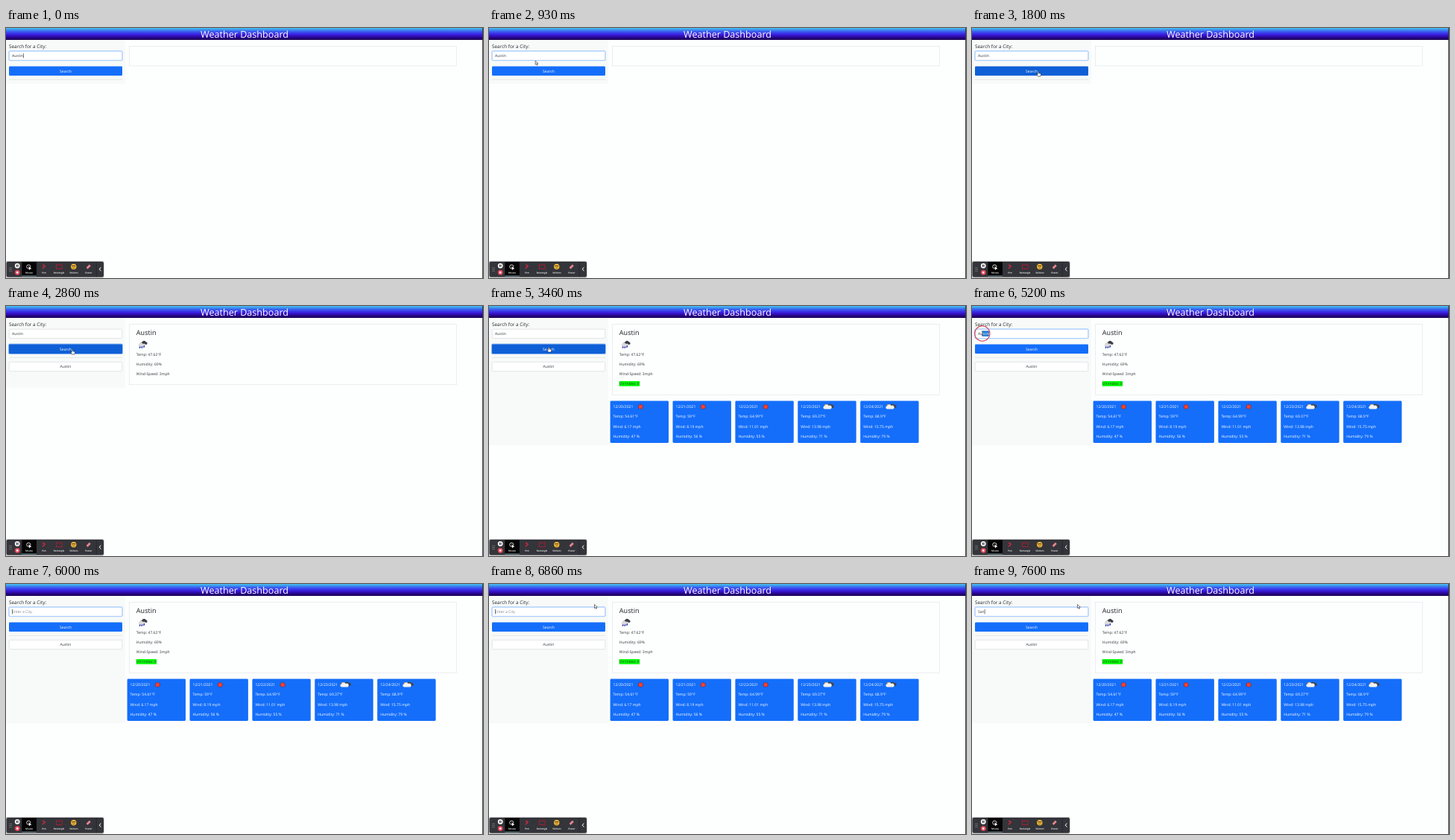
Write an HTML page that moves like this. It is 640 by 336 pixels and loops after 8000 ms.

```html
<!DOCTYPE html>
<html lang="en">
<head>
<meta charset="utf-8">
<title>Weather Dashboard</title>
<style>
html, body { margin: 0; width: 100%; height: 100%; overflow: hidden; background: #fdfefe; }
svg { display: block; width: 640px; height: 336px; }
text { font: 5.05px "Open Sans", "Noto Sans", sans-serif; fill: #33383d; text-rendering: geometricPrecision; white-space: pre; }
.mid { text-anchor: middle; }
.title { font-size: 12.6px; font-weight: 500; fill: #fff; }
.label { font-size: 6.4px; font-weight: 500; fill: #212529; }
.city { font-size: 9.1px; font-weight: 500; fill: #212529; }
.white { fill: #fff; }
.tool { font-size: 3.1px; font-weight: 600; fill: #fff; text-anchor: middle; }
.hint { fill: #7b848c; }
.box { fill: #fff; stroke: #ced4da; stroke-width: .6; }
</style>
</head>
<body>
<svg viewBox="0 0 640 336">
  <defs>
    <linearGradient id="sky" x2="0" y2="1">
      <stop stop-color="#45c4ee"/><stop offset=".3" stop-color="#3a5cf0"/>
      <stop offset=".55" stop-color="#3a1ee0"/><stop offset=".85" stop-color="#25007e"/>
      <stop offset="1" stop-color="#16004c"/>
    </linearGradient>
    <g id="sun">
      <path d="M0-4.2L1-2.4 3-3 2.5-1 4.2 0 2.5 1 3 3 1 2.4 0 4.2-1 2.4-3 3-2.5 1-4.2 0-2.5-1-3-3-1-2.4Z" fill="#7d2638"/>
      <circle r="2.7" fill="#f4402c"/>
    </g>
    <g id="cloud">
      <circle cx="-3" cy="-1" r="2.5" fill="#f0a53c"/>
      <path d="M0 1.5a2.3 2.3 0 0 1 0-4.4 3 3 0 0 1 5 .5 2 2 0 0 1 1.4 3.9Z" fill="#41464f"/>
      <path d="M-4.8 3a2 2 0 0 1 .2-4 3 3 0 0 1 5.3-.4 2.3 2.3 0 0 1 2.7 4.4Z" fill="#f3f3f3"/>
    </g>
    <g id="rain">
      <circle cx="-2" cy="-.5" r="2.4" fill="#ee9a55"/>
      <path d="M-1-.5a2 2 0 0 1 .5-3.6 2.8 2.8 0 0 1 4.8.2 2 2 0 0 1 1.2 3.4Z" fill="#3b3c45"/>
      <path d="M-4.6 2a1.7 1.7 0 0 1 .3-3.3 2.7 2.7 0 0 1 4.6 0 1.8 1.8 0 0 1 2.4 3.3Z" fill="#d9dade"/>
      <path d="M-3.3 2.2l-1 2.2M-.6 2.2l-1 2.2M2.2 1.2l-1 2.4" stroke="#2932a8" stroke-width="1.5"/>
    </g>
  </defs>

  <rect width="640" height="336" fill="#fdfefe"/>
  <rect id="side" y="16" width="160" fill="#f7faf8"/>
  <rect width="640" height="16" fill="url(#sky)"/>
  <text class="title mid" x="320" y="13.2">Weather Dashboard</text>

  <text class="label" x="4" y="26.6">Search for a City:</text>
  <rect id="ring" x="3.3" y="30.3" width="153.4" height="14" rx="2" fill="#bcd6fe"/>
  <rect id="field" class="box" x="4.2" y="31.2" width="151.6" height="12.2" rx="1.3"/>
  <rect id="mark" y="33.4" height="7.4" fill="#1a78d6"/>
  <text id="value" x="8" y="39"><tspan id="plain"></tspan><tspan id="picked" class="white"></tspan></text>
  <text id="hint" class="hint" x="8" y="39">Enter a City</text>
  <rect id="caret" y="34" width=".6" height="6.4" fill="#222"/>
  <rect id="glow" x="3" y="50.5" width="154" height="14.6" rx="2" fill="#8fb8f6"/>
  <rect id="button" x="4" y="51.6" width="152" height="12.4" rx="1.3"/>
  <text class="mid white" x="80" y="59.7">Search</text>
  <path d="M4 69.3H156" stroke="#d3d7d7" stroke-width=".6"/>
  <g id="history">
    <rect class="box" x="4.2" y="75.3" width="151.6" height="12.4" rx="1.3"/>
    <text class="mid" x="80" y="83.4">Austin</text>
  </g>

  <rect id="panel" x="165.4" y="24.5" width="439" fill="none" stroke="#dfe3e6" stroke-width=".6"/>
  <g id="today">
    <text class="city" x="174.8" y="39.2">Austin</text>
    <use href="#rain" x="183.5" y="52.2"/>
    <text x="174.8" y="66.5">Temp: 47.62°F</text>
    <text x="174.8" y="79.8">Humidity: 69%</text>
    <text x="174.8" y="93.2">Wind-Speed: 3mph</text>
  </g>
  <g id="forecast">
    <rect x="174.7" y="101" width="27.4" height="6.8" fill="#0f0"/>
    <text x="174.8" y="106.3">UV-Index: 0</text>
  </g>

  <g id="bar">
    <rect x="-1" y="313" width="133" height="23" rx="3" fill="#000" opacity=".18"/>
    <rect x=".5" y="314" width="130.5" height="20.8" rx="2" fill="#34353a"/>
    <path d="M5 321.8v6M7 321.8v6" stroke="#aaa" stroke-dasharray=".9 1.4"/>
    <circle cx="15.2" cy="319.6" r="3.4" fill="#fff"/>
    <path d="M14.4 318v3.2M16.1 318v3.2" stroke="#111" stroke-width=".9"/>
    <circle cx="15.2" cy="328.6" r="3.4" fill="#e5485a"/>
    <rect x="14" y="327.4" width="2.4" height="2.4" fill="#fff"/>
    <rect x="21.3" y="314.4" width="19.6" height="19" fill="#050506"/>
    <path d="M21.3 333.3h19.6" stroke="#8fb5c4" stroke-width=".8"/>
    <circle cx="30.3" cy="320.8" r="2.6" fill="none" stroke="#e9dcdc" stroke-width=".9"/>
    <path d="M30.3 320.3l4 3.6-1.9.2-1.3 1.5Z" fill="#fff"/>
    <path d="M49 323.2l3.8-3.6M49.2 319.4q1.4-1.5 2.2.2" stroke="#e02a42" stroke-width="1.3" fill="none"/>
    <rect x="67.5" y="318.2" width="7.6" height="5.4" fill="none" stroke="#a51d34"/>
    <circle cx="90.8" cy="320.8" r="3.7" fill="#f4bd38"/>
    <path d="M88.3 319.8h5" stroke="#5b3820" stroke-width="1.2"/>
    <path d="M89.1 322.1q1.7 1.5 3.4 0" stroke="#5b3820" stroke-width=".7" fill="none"/>
    <path d="M108.6 323l4.2-4.2" stroke="#e78591" stroke-width="2.8"/>
    <path d="M121.3 314.5v19.8" stroke="#222327" stroke-width=".7"/>
    <path d="M127.3 321.6l-2 2.5 2 2.5" stroke="#fff" fill="none"/>
  </g>
  <path d="M639.5 0V336" stroke="#30343a" stroke-width=".9"/>

  <circle id="press" r="10.2" fill="none" stroke="#d8435c" stroke-width="1.1"/>
  <g id="pointer" stroke="#222" stroke-width=".6" stroke-linejoin="round">
    <path id="arrow" d="M0 0V5l1.2-1 .9 1.9 1-.4-.9-1.9 1.6-.1Z" fill="#fff"/>
    <path id="hand" d="M-.8 0q.8-1 1.5 0v2l2.2.5q.9.3.6 1.6l-.7 2.1H-.6L-2 3.7q.2-1 1.2-.2Z" fill="#fff"/>
    <path id="beam" d="M-1-3h2M0-3v6M-1 3h2" fill="none"/>
  </g>
</svg>
<script>
const LOOP = 8000, SELECT_FROM = 4800, SELECT_TO = 5450, CLEAR = 5750;
const NS = "http://www.w3.org/2000/svg";
const $ = id => document.getElementById(id);
const set = (id, attrs) => { for (const k in attrs) $(id).setAttribute(k, attrs[k]); };
const show = (id, on) => $(id).style.display = on ? "" : "none";

function add(parent, tag, attrs, text = "") {
  const el = document.createElementNS(NS, tag);
  for (const k in attrs) el.setAttribute(k, attrs[k]);
  el.textContent = text;
  $(parent).append(el);
}

[["54.61", "6.17", 47], ["59", "8.19", 56], ["64.99", "11.01", 55],
 ["69.37", "13.98", 71], ["68.9", "15.75", 79]].forEach(([temp, wind, wet], i) => {
  const x = 162.6 + i * 83.9;
  add("forecast", "rect", { x, y: 127.6, width: 78.4, height: 56.4, rx: 1.4, fill: "#146efa" });
  [`12/${20 + i}/2021`, `Temp: ${temp}°F`, `Wind: ${wind} mph`, `Humidity: ${wet} %`].forEach((line, row) =>
    add("forecast", "text", { x: x + 4, y: 137 + row * 13.3, class: "white" }, line));
  add("forecast", "use", { href: i < 3 ? "#sun" : "#cloud", x: x + 40.8, y: 135.4 });
});
["Mouse", "Pen", "Rectangle", "Stickers", "Eraser"].forEach((name, i) =>
  add("bar", "text", { x: 31 + i * 20, y: 329.6, class: "tool" }, name));

// Pointer stops: time, x, y
const path = [[900, 62, 44], [1500, 89, 58.8], [3300, 89, 58.8], [4000, 24, 37], [SELECT_FROM, 24, 37],
  [5200, 13.8, 37], [SELECT_TO, 7, 37], [5850, 7, 37], [6500, 141.5, 27.5]];
function pointerAt(t) {
  const n = path.findIndex(p => p[0] > t);
  if (n < 0) return path.at(-1).slice(1);
  if (!n) return path[0].slice(1);
  const [a, b] = [path[n - 1], path[n]];
  const u = (t - a[0]) / (b[0] - a[0]), e = u * u * (3 - 2 * u);
  return [a[1] + (b[1] - a[1]) * e, a[2] + (b[2] - a[2]) * e];
}

const within = (t, a, b) => t >= a && t < b;

function draw(t) {
  const [x, y] = pointerAt(t);
  const loaded = t >= 2600, full = t >= 3050;
  const clicked = within(t, 2200, SELECT_FROM), focused = !clicked;
  const hover = x > 4 && x < 156 && y > 51 && y < 64 && t > 900;

  set("side", { height: full ? 171 : loaded ? 94 : 59 });
  set("panel", { height: full ? 94.8 : loaded ? 81.2 : 26.4 });
  show("history", loaded);
  show("today", loaded);
  show("forecast", full);
  show("ring", focused);
  set("field", { style: focused ? "stroke:#86b7fe" : "" });
  show("glow", clicked);
  set("button", { fill: hover || clicked ? "#0f5fd6" : "#146efa" });

  // Field text, selection and caret
  const text = t < CLEAR ? "Austin" : "San".slice(0, [7120, 7310, 7500].filter(k => t >= k).length);
  const value = $("value");
  $("plain").textContent = text;
  $("picked").textContent = "";
  const edge = n => 8 + (n ? value.getSubStringLength(0, n) : 0);
  const end = edge(text.length);
  let from = text.length;
  if (within(t, SELECT_FROM, CLEAR)) while (from && edge(from) > x + 1) from--;
  const left = edge(from);
  $("plain").textContent = text.slice(0, from);
  $("picked").textContent = text.slice(from);
  set("mark", { x: left, width: end - left });
  show("hint", !text);
  const lastKey = t >= 7500 ? 7500 : t >= 7120 ? 7120 : t >= CLEAR ? CLEAR : 0;
  show("caret", focused && from === text.length && (t - lastKey) % 1060 < 530);
  set("caret", { x: end + .1 });

  const down = within(t, 2150, 2400) || within(t, SELECT_FROM, SELECT_TO);
  show("press", down);
  set("press", { cx: x, cy: y });
  const inField = x > 4 && x < 156 && y > 31 && y < 43.5;
  show("pointer", t >= 900);
  set("pointer", { transform: `translate(${x} ${y})` });
  show("hand", hover);
  show("beam", inField && down);
  show("arrow", !hover && !inField);
}

const start = performance.now();
function tick() {
  draw((performance.now() - start) % LOOP);
  requestAnimationFrame(tick);
}
tick();
</script>
</body>
</html>
```
